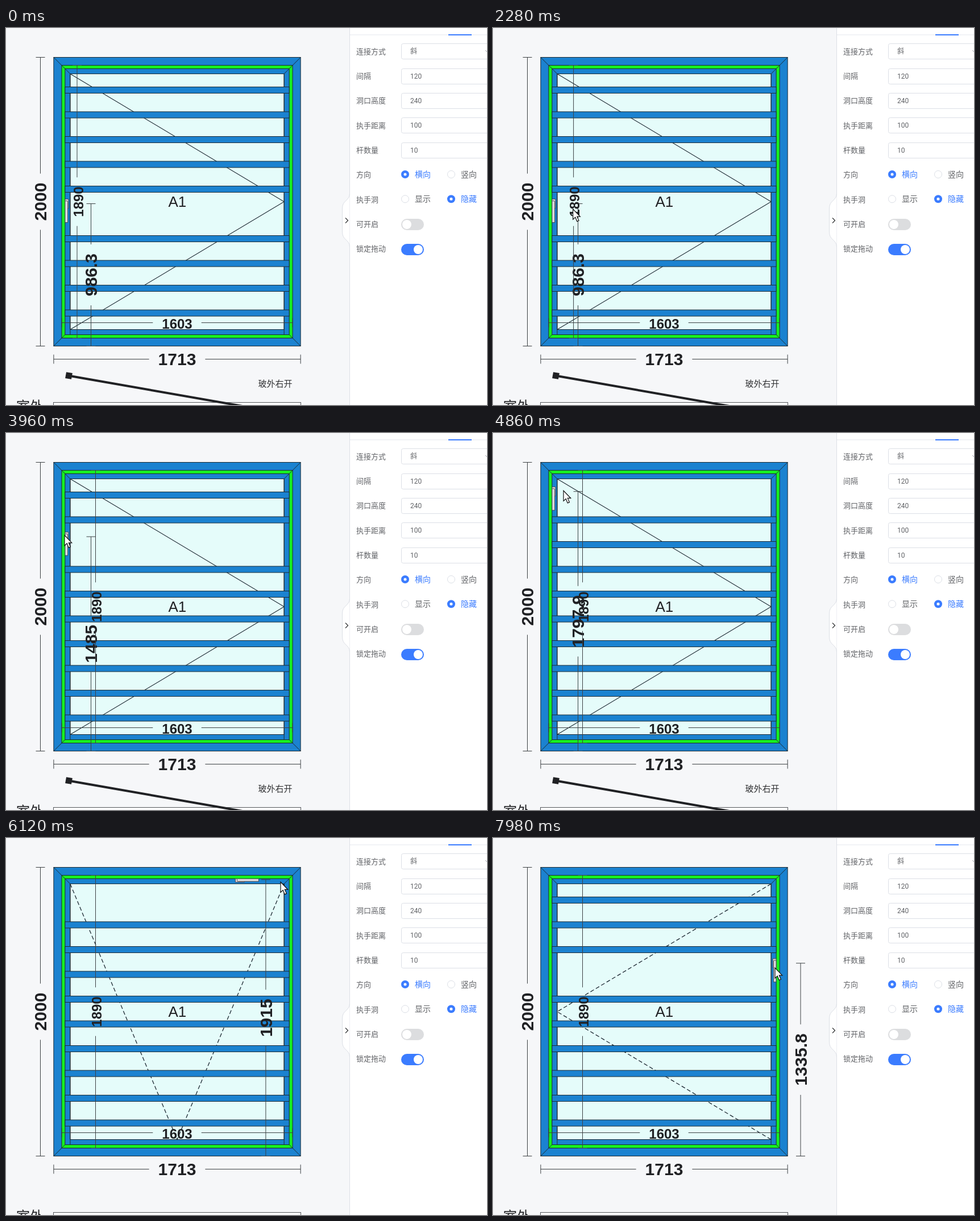
Animation of 846 by 662 pixels, one loop 8 s. Source, as an HTML page:

```html
<!DOCTYPE html>
<html lang="zh-CN">
<head>
<meta charset="utf-8">
<title>Window designer</title>
<style>
html, body { margin: 0; width: 100%; height: 100%; overflow: hidden; background: #f6f7f9; }
svg { display: block; position: absolute; left: 0; top: 0; }
text { font-family: "Noto Sans CJK SC", "Noto Sans CJK", sans-serif; }
.dim path { stroke: #3c4043; stroke-width: 1; fill: none; }
.dim text { font-family: "Liberation Sans", Arial, sans-serif; font-weight: 700; fill: #202124; text-anchor: middle; }
.name { font: 26px "Liberation Sans", Arial, sans-serif; fill: #202124; }
.label { font-size: 13px; fill: #606266; }
.value { font: 12px Roboto, "Noto Sans CJK SC", sans-serif; fill: #606266; }
.option { font-size: 14px; fill: #606266; }
.option.on { fill: #3b7cff; }
</style>
</head>
<body>
<svg id="stage" width="846" height="662" viewBox="0 0 846 662">
  <g id="plan"></g>
  <g id="moving"></g>
  <g id="panel"></g>
  <path id="cursor" d="M0 0V18.2L4.2 14.3L7.2 21.6L10.4 20.3L7.3 13.2H12.7Z" fill="#fff" stroke="#111" stroke-width="1.2"/>
</svg>
<script>
const LOOP = 8000, STEP = 60;
const INK = '#1d2a33', BLUE = '#1b82d0', GREEN = '#16f022', GLASS = '#e5fcfa';
const ACCENT = '#3b7cff', LINE = '#dcdfe6';
const $ = id => document.getElementById(id);

// Window geometry: 1713 x 2000 mm around a centre; members are nested insets.
const SCALE = 507 / 2000, CX = 301, CY = 305;
const box = inset => {
  const w = 1713 * SCALE / 2 - inset, h = 2000 * SCALE / 2 - inset;
  return { l: CX - w, r: CX + w, t: CY - h, b: CY + h, w: 2 * w, h: 2 * h };
};
const outer = box(0), sash = box(14), inner = box(20), glass = box(29);

// Motion
const TO_TOP = 5400, TO_RIGHT = 6540;
const move = (t, from, to, by, pow = 1) =>
  by * (1 - (1 - Math.min(1, Math.max(0, (t - from) / (to - from)))) ** pow);

const LEFT_START = 986.3, RIGHT_START = 1881;
const leftHeight = t => LEFT_START + move(t, 2850, 3780, 481.8) +
  move(t, 3900, 4380, 135) + move(t, 4560, 4860, 194.8);
const rightHeight = t => RIGHT_START - move(t, 6480, 7260, 255, 1.6) - move(t, 7260, 7980, 290.2);
const topHandleX = t => 125 + move(t, 5640, 6240, 358);
const innerDimX = t => 125 + move(t, 1860, 1980, 6) + move(t, 2160, 2460, 26.5);

// Free pointer trips: from, to, dx, dy. Drags are added on top.
const trips = [
  [0, 780, -638, 226], [960, 1200, -2, -11], [1680, 1860, 15, 13], [2460, 2700, -53.5, -12],
  [4680, 4860, 21, 1], [5280, 5520, 1, -24], [6420, 7080, 10, 8.5], [7260, 7980, 3, 4]
];
function cursorAt(t) {
  const slide = move(t, 5640, 6120, 1);
  let x = 749 + innerDimX(t) - 125 + slide * 358;
  let y = 90 - 12 * Math.sin(Math.PI * slide) +
    (LEFT_START - leftHeight(t) + RIGHT_START - rightHeight(t)) * SCALE;
  for (const [from, to, dx, dy] of trips) {
    x += move(t, from, to, dx, 1.3);
    y += move(t, from, to, dy, 1.3);
  }
  return [x, y];
}

// Drawing helpers
const rect = (x, y, w, h, fill, stroke = INK, r = 0) =>
  `<rect x="${x}" y="${y}" width="${w}" height="${h}" rx="${r}" fill="${fill}" stroke="${stroke}"/>`;
const path = (d, stroke = INK, extra = '') => `<path d="${d}" fill="none" stroke="${stroke}" ${extra}/>`;
const text = (x, y, s, cls = '', extra = '') => `<text x="${x}" y="${y}" class="${cls}" ${extra}>${s}</text>`;
const circle = (x, y, r, fill, stroke = 'none') =>
  `<circle cx="${x}" cy="${y}" r="${r}" fill="${fill}" stroke="${stroke}"/>`;

// Dimension line with end ticks and a centred label.
function dim(transform, len, label, size) {
  const chars = [...label].reduce((n, c) => n + (c === '.' ? 0.278 : 0.556), 0);
  const gap = chars * size / 2 + 16, mid = len / 2;
  return `<g class="dim" transform="${transform}">
    <path d="M0 -8V8M${len} -8V8M0 0H${mid - gap}M${mid + gap} 0H${len}"/>
    <text x="${mid}" y="10.8" font-size="${size}">${label}</text></g>`;
}
const vDim = (x, y, y2, label, size = 30) => dim(`translate(${x} ${y2}) rotate(-90)`, y2 - y, label, size);
const hDim = (x, x2, y, label, size = 30) => dim(`translate(${x} ${y})`, x2 - x, label, size);

function drawPlan() {
  const member = (b, fill) => rect(b.l, b.t, b.w, b.h, fill);
  const { l, r, t, b } = outer, g = glass;
  $('plan').innerHTML =
    rect(-1, -1, 605.5, 664, '#f6f7f9', 'none') +
    vDim(60.5, t, b, '2000') + hDim(l, r, 581.5, '1713') +
    text(18, 673, '室外', '', 'font-size="24" fill="#202124"') +
    rect(83.5, 657.5, 435, 20, '#fbfbfc', '#55585c') +
    member(outer, BLUE) + member(sash, GREEN) + member(inner, BLUE) + member(glass, GLASS) +
    path(`M${l} ${t}L${g.l} ${g.t}V${inner.b}M${r} ${t}L${g.r} ${g.t}V${inner.b}` +
      `M${l} ${b}L${inner.l} ${inner.b}M${r} ${b}L${inner.r} ${inner.b}`);
}

function drawPanel() {
  const row = i => 41.3 + i * 43.3;
  let s = rect(604.5, -1, 260, 664, '#fff', LINE) +
    path('M605 12H846', '#e4e7ed') + path('M778 12H819', ACCENT, 'stroke-width="2"') +
    '<path d="M604.5 291C604 304 591.5 302 591.5 317V358C591.5 373 604 371 604.5 384" fill="#fff" stroke="#dcdfe6"/>' +
    path('M597 333.5L601.5 338L597 342.5', '#303133', 'stroke-width="1.2"');
  ['连接方式', '间隔', '洞口高度', '执手距离', '杆数量', '方向', '执手洞', '可开启', '锁定拖动']
    .forEach((name, i) => s += text(616, row(i) + 4.5, name, 'label'));
  ['斜', '120', '240', '100', '10'].forEach((v, i) => {
    const y = Math.round(row(i) - 14) + 0.5;
    s += rect(695.5, y, 170, 27, '#fff', LINE, 3) + text(711, y + 17.8, v, 'value');
  });
  s += path('M843 39L847.5 43.5', '#a8abb2');
  const radio = (x, y, name, on) =>
    (on ? circle(x, y, 7, ACCENT) + circle(x, y, 2.5, '#fff') : circle(x, y, 6.5, '#fff', LINE)) +
    text(x + 17, y + 5, name, on ? 'option on' : 'option');
  s += radio(702, 257, '横向', true) + radio(783, 257, '竖向', false) +
    radio(702, 300.3, '显示', false) + radio(783, 300.3, '隐藏', true);
  const toggle = (y, on) => rect(695, y - 10, 40, 20, on ? ACCENT : '#dcdddf', 'none', 10) +
    circle(on ? 725 : 705, y, 8, '#fff');
  $('panel').innerHTML = s + toggle(345, false) + toggle(389, true);
}

// Local x runs away from the sash edge, local y along it.
const handle = transform => `<g transform="${transform}" stroke="#3a3f45" stroke-width=".9">
  <path d="M0 -8H6V8H0Z" fill="#ead9e6"/>
  <path d="M0 33V-4Q0 -5 1 -5H3Q4.8 -5 4.8 -3V33Z" fill="#dcd8de"/></g>`;

function drawMoving(t) {
  const side = t < TO_TOP ? 'left' : t < TO_RIGHT ? 'top' : 'right';
  const mm = { left: leftHeight(t), top: 1915, right: rightHeight(t) }[side];
  const y = outer.b - mm * SCALE, px = topHandleX(t), g = glass;
  const [dimX, grip, swing] = {
    left: [149.5, `translate(${inner.l} ${y})`, `M${g.l} ${g.t}L${g.r} ${CY}L${g.l} ${g.b}`],
    top: [px + 45.5, `matrix(0 1 1 0 ${px} ${inner.t})`, `M${g.l} ${g.t}L${CX} ${g.b}L${g.r} ${g.t}`],
    right: [541, `translate(${inner.r} ${y}) scale(-1 1)`, `M${g.r} ${g.t}L${g.l} ${CY}L${g.r} ${g.b}`]
  }[side];

  // The bar nearest the handle gives way to it.
  const bars = Array.from({ length: 10 }, (_, i) => 109 + i * 43.5);
  const hidden = bars.reduce((a, b) => Math.abs(b - y) < Math.abs(a - y) ? b : a);

  let s = path(swing, INK, side === 'left' ? 'stroke-width="1.1"' : 'stroke-width="1.3" stroke-dasharray="7 4"');
  for (const b of bars) if (b !== hidden) s += rect(inner.l, b - 5.5, inner.w, 11, BLUE);
  s += handle(grip) + text(285.5, 313.5, 'A1', 'name') +
    hDim(sash.l, sash.r, 517.5, '1603', 24) +
    vDim(dimX, y, outer.b, String(+mm.toFixed(1))) +
    vDim(innerDimX(t), sash.t, sash.b, '1890', 24);
  if (side === 'left') {
    s += path('M110 610.5L416 664', '#202124', 'stroke-width="4"') +
      '<rect x="-5.5" y="-5.5" width="11" height="11" transform="translate(110.5 610.5) rotate(10)" fill="#202124"/>' +
      text(443.5, 629.5, '玻外右开', '', 'font-size="15" fill="#303133"');
  }
  $('moving').innerHTML = s;

  const cursor = $('cursor');
  cursor.setAttribute('transform', `translate(${cursorAt(t)})`);
  cursor.setAttribute('visibility', t < STEP ? 'hidden' : 'visible');
}

drawPlan();
drawPanel();

const start = performance.now();
let shown = -1;
function tick() {
  const t = Math.floor((performance.now() - start) % LOOP / STEP) * STEP;
  if (t !== shown) drawMoving(shown = t);
  requestAnimationFrame(tick);
}
tick();
</script>
</body>
</html>
```
